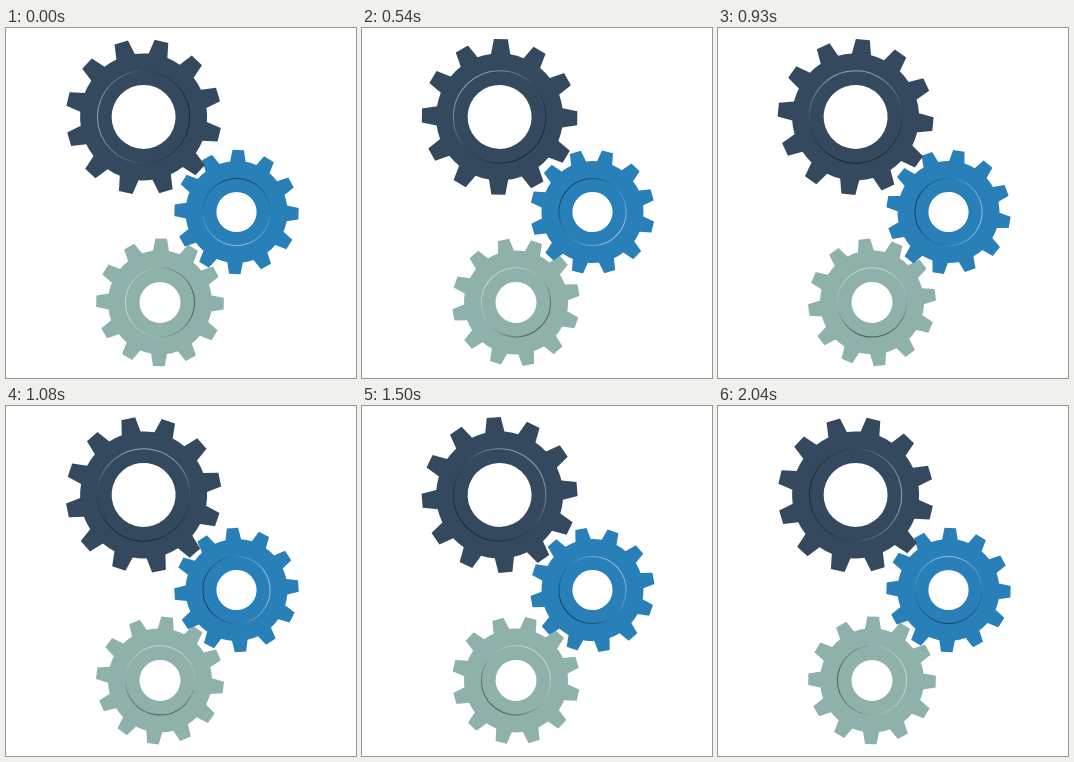
An HTML page for the animation above (2.07 s loop, 350 px wide and 350 px high).

```html
<!DOCTYPE html>
<html lang="en">
<head>
<meta charset="utf-8">
<title>Turning gears</title>
<style>
  html, body { margin: 0; width: 100%; height: 100%; overflow: hidden; background: #fff; }
  svg { display: block; width: 100vw; height: 100vh; }
</style>
</head>
<body>
<svg viewBox="0 0 350 350"></svg>
<script>
const NS = 'http://www.w3.org/2000/svg';
const svg = document.querySelector('svg');
const STEP = 30, FRAMES = 69, TEETH = 12;

// start: angle of the first tooth; light: side of the ring's highlight; both clockwise from the top
const gears = [
  { x: 154, y: 274.4, outer: 64, body: 52, hole: 20.5, ring: 34.6, tip: 5.8, base: 8,
    start: 1.1, light: -90, dir: 1, color: '#8fb1ab' },
  { x: 230.5, y: 184, outer: 62.3, body: 51, hole: 20.1, ring: 33.6, tip: 5.7, base: 7.8,
    start: 1.6, light: 180, dir: -1, color: '#2980b9' },
  { x: 137.6, y: 88.9, outer: 78, body: 63.5, hole: 32, ring: 46.2, tip: 7, base: 9.6,
    start: 13.3, light: -90, dir: 1, color: '#34495e' }
];

function add(parent, tag, attrs) {
  const el = document.createElementNS(NS, tag);
  for (const key in attrs) el.setAttribute(key, attrs[key]);
  return parent.appendChild(el);
}

function gearPath({ outer, body, hole, tip, base, start }) {
  let d = '';
  for (let i = 0; i < TEETH; i++) {
    const mid = start * Math.PI / 180 + i * 2 * Math.PI / TEETH;
    const at = (r, half) => {
      const a = mid + Math.asin(half / r);
      return `${(r * Math.sin(a)).toFixed(2)} ${(-r * Math.cos(a)).toFixed(2)}`;
    };
    d += (i ? `A${body} ${body} 0 0 1 ` : 'M') + at(body, -base);
    d += `L${at(outer, -tip)}L${at(outer, tip)}L${at(body, base)}`;
  }
  const arc = `a${hole} ${hole} 0 1 0 `;
  return `${d}A${body} ${body} 0 0 1 ${d.slice(1, d.indexOf('L'))}Z` +
    `M${-hole} 0${arc}${2 * hole} 0${arc}${-2 * hole} 0Z`;
}

gears.forEach((gear, i) => {
  const grad = add(svg, 'linearGradient', {
    id: 'edge' + i, gradientUnits: 'userSpaceOnUse',
    x1: 0, y1: -gear.ring, x2: 0, y2: gear.ring,
    gradientTransform: `rotate(${gear.light})`
  });
  [[0, '#fff', 0.5], [0.5, '#fff', 0], [0.5, '#000', 0], [1, '#000', 0.5]].forEach(
    ([offset, color, alpha]) =>
      add(grad, 'stop', { offset, 'stop-color': color, 'stop-opacity': alpha }));
  gear.el = add(svg, 'g', {});
  add(gear.el, 'path', { d: gearPath(gear), fill: gear.color, 'fill-rule': 'evenodd' });
  add(gear.el, 'circle', { r: gear.ring, fill: 'none', stroke: `url(#edge${i})`, 'stroke-width': 1 });
});

// Half a turn per loop, then the highlights jump back.
const begin = performance.now();
function draw(now) {
  const frame = Math.floor(Math.max(0, now - begin) / STEP) % FRAMES;
  const turn = 180 * frame / (FRAMES - 1);
  for (const { el, x, y, dir } of gears) {
    el.setAttribute('transform', `translate(${x} ${y}) rotate(${dir * turn})`);
  }
  requestAnimationFrame(draw);
}
draw(begin);
</script>
</body>
</html>
```
